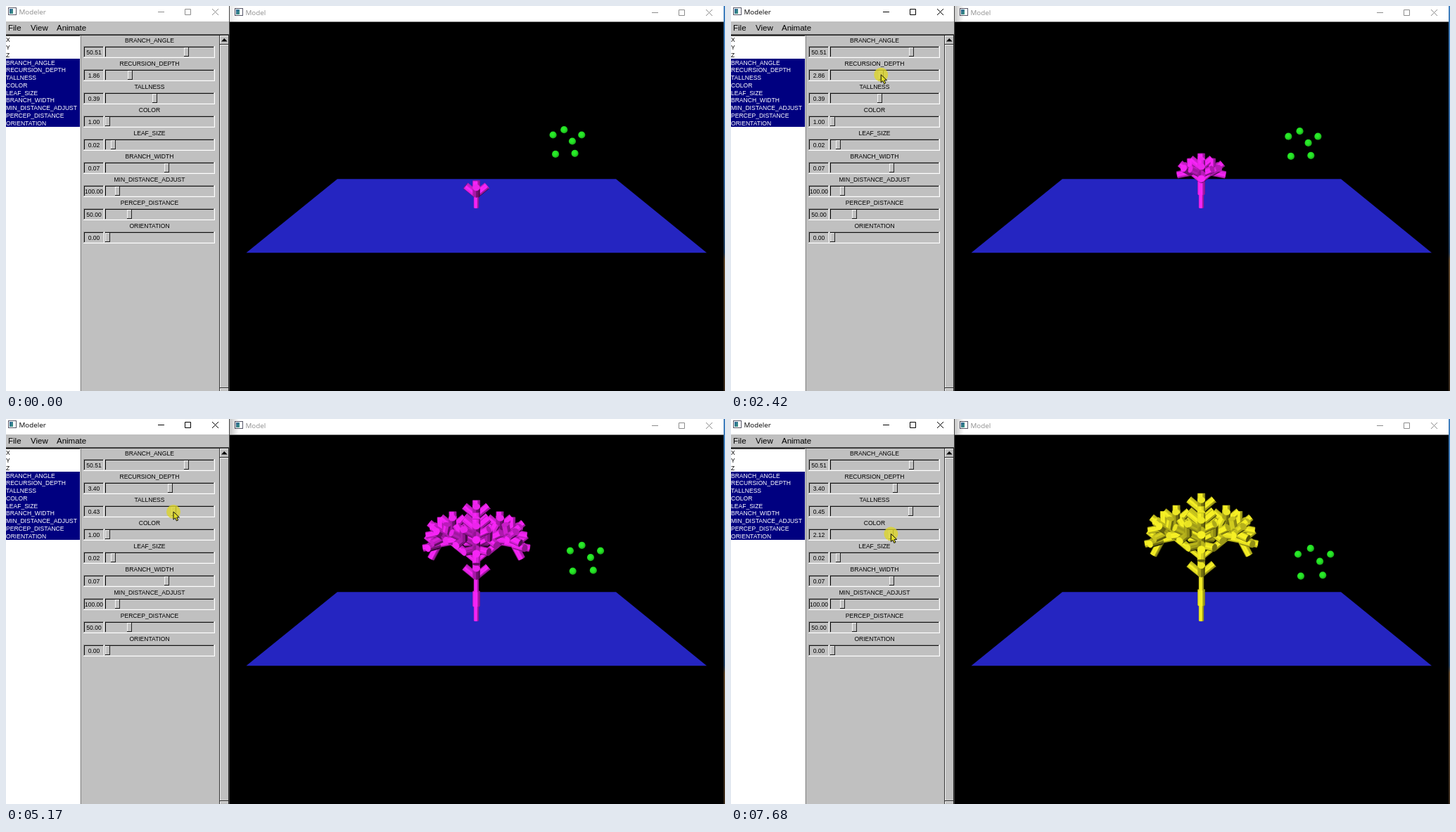
An HTML page that plays this animation: 1022x548 px, repeating every 8000 ms.

```html
<!DOCTYPE html>
<html lang="en">
<head>
<meta charset="utf-8">
<title>Modeler</title>
<style>
html, body { margin: 0; width: 100%; height: 100%; overflow: hidden; background: #000; }
svg { display: block; width: 1022px; height: 548px; }
text { font: 8.55px "Liberation Sans", Arial, sans-serif; white-space: pre; }
.menu { font-size: 11.5px; }
.title { font: 9.8px "Open Sans", "Noto Sans", sans-serif; }
.mid { text-anchor: middle; }
.crisp { shape-rendering: crispEdges; }
#tree { stroke-width: .6; stroke-linejoin: round; }
</style>
</head>
<body>
<svg id="stage" viewBox="0 0 1022 548" xmlns="http://www.w3.org/2000/svg"></svg>
<script>
const LOOP = 8000, STEP = 70;
const TRACK_X = 144.5, TRACK_W = 148;
const stage = document.getElementById('stage');

// Pointer moves: start, end, x, y
const ENTRY = [822, 494];
const MOVES = [
  [40, 850, 157, 96], [850, 1270, 176.3, 94], [1660, 1730, 177.1, 96], [1730, 2150, 207, 97],
  [2350, 2540, 231, 100], [3280, 3350, 233.3, 100], [3560, 4090, 167, 142], [4090, 4370, 211.1, 132],
  [4430, 4990, 238, 132], [5100, 5460, 255.5, 132], [5660, 6150, 144.5, 164],
  [6470, 6900, 176.3, 161], [7000, 7200, 190, 162], [7340, 7680, 227.4, 163.5]
];

// While the button is down the thumb follows the pointer
const DRAGS = {
  depth: { param: 1, press: 1470, release: 3620, min: 1, max: 5, home: 176.3, goal: 233.3 },
  tall: { param: 2, press: 4500, release: 5730, min: 0.3, max: 0.5, home: 211.1, goal: 255.5 },
  color: { param: 3, press: 6540, release: LOOP, min: 1, max: 3, home: 144.5, goal: 227.4 }
};

const BALLS = [[0, 0], [-15.7, 7.3], [25, 7.3], [11.7, 16.3], [-12.2, 34.7], [15.3, 33.6]];
const TINTS = [[246, 37, 246], [246, 240, 37]];

// name, value, thumb centre
const PARAMS = [
  ['BRANCH_ANGLE', '50.51', 256.5], ['RECURSION_DEPTH', '1.86', 176.5], ['TALLNESS', '0.39', 211],
  ['COLOR', '1.00', 144.5], ['LEAF_SIZE', '0.02', 152.5], ['BRANCH_WIDTH', '0.07', 228.5],
  ['MIN_DISTANCE_ADJUST', '100.00', 158], ['PERCEP_DISTANCE', '50.00', 175.5], ['ORIENTATION', '0.00', 144.5]
];

const box = (x, y, w, h, fill, more = '') => `<rect x="${x}" y="${y}" width="${w}" height="${h}" fill="${fill}" ${more}/>`;
const label = (x, y, s, more = '') => `<text x="${x}" y="${y}" ${more}>${s}</text>`;

function bevel(x, y, w, h, light, dark) {
  return box(x, y, w, h, '#c0c0c0') + box(x, y, w, 1, light) + box(x, y, 1, h, light) +
    box(x, y + h - 1, w, 1, dark) + box(x + w - 1, y, 1, h, dark);
}
const raised = (x, y, w, h) => bevel(x, y, w, h, '#f4f4f4', '#222');
const sunken = (x, y, w, h) => bevel(x, y, w, h, '#999', '#fff') + bevel(x + 1, y + 1, w - 2, h - 2, '#111', '#ccc');

function titleBar(x, y, name, xs) {
  const [a, b, c] = xs;
  return box(x + 3.5, y - 5.5, 11, 10, '#fff', 'stroke="#556"') + box(x + 5, y - 4, 5, 7, 'url(#icon)') +
    label(x + 18.5, y + 3.5, name, 'class="title" fill="currentColor"') +
    `<path d="M${a} ${y + .5}h9M${b + .5} ${y - 3.5}h8v8h-8zM${c} ${y - 4}l9 9m0-9l-9 9" fill="none" stroke="currentColor"/>`;
}

function slider([name, value], i) {
  const y = 33 * i;
  return label(204, y + 51.5, name, 'class="mid"') +
    `<g class="crisp">${sunken(110, y + 57, 30, 17)}${sunken(140, y + 57, 157, 17)}</g>` +
    label(125, y + 68.6, value, `class="mid" id="value${i}"`) +
    `<g class="crisp" id="thumb${i}">${raised(-3, y + 59, 7, 13)}</g>`;
}

const listed = ['X', 'Y', 'Z', ...PARAMS.map(p => p[0])];

stage.innerHTML = `
<defs>
  <linearGradient id="icon" x2="1" y2="1"><stop stop-color="#28609a"/><stop offset="1" stop-color="#3f9a80"/></linearGradient>
  <linearGradient id="edge" x2="0" y2="1"><stop stop-color="#3f7fbf"/><stop offset=".45" stop-color="#2a5c94"/><stop offset=".64" stop-color="#24405f"/><stop offset=".66" stop-color="#5d4529"/><stop offset="1" stop-color="#3a2b1c"/></linearGradient>
  <linearGradient id="shade"><stop stop-opacity=".22"/><stop offset="1" stop-opacity="0"/></linearGradient>
  <radialGradient id="ball" cx=".42" cy=".4" r=".62"><stop stop-color="#2cf22c"/><stop offset=".55" stop-color="#24e024"/><stop offset="1" stop-color="#18a018"/></radialGradient>
</defs>
${box(0, 0, 1022, 548, '#000')}
${box(318, 0, 702, 22.5, '#fff')}
${box(1020, 0, 2, 548, 'url(#edge)')}
<g color="#8c8c8c">${titleBar(322, 9, 'Model', [918, 956, 995])}</g>
<polygon points="471,246.2 867,246.2 996,351.3 341.5,351.3" fill="#2525c1"/>
<g id="tree"></g>
<g id="swarm"></g>
${box(318, 0, 13, 22, 'url(#shade)', 'id="shadow"')}
${box(0, 0, 317, 22, '#fff')}
<g id="bar">${titleBar(0, 8, 'Modeler', [216, 254, 293])}</g>
${box(0, 22, 317, 526, '#c0c0c0')}
${label(3, 35, 'File', 'class="menu"')}${label(35, 35, 'View', 'class="menu"')}${label(72, 35, 'Animate', 'class="menu"')}
<g class="crisp">
${box(0, 40, 317, 1, '#555')}${box(0, 41, 317, 1, '#222')}
${box(0, 42, 105, 506, '#fff')}${box(0, 42, 105, 1, '#444')}${box(0, 75, 105, 97, '#000080')}
${box(105, 42, 1, 506, '#e0e0e0')}${box(106, 42, 1, 506, '#888')}
${raised(304, 42, 13, 13)}${raised(304, 55, 13, 489)}${raised(304, 544, 13, 13)}
${box(303, 42, 1, 506, '#333')}${box(317, 0, 1, 548, '#444')}
</g>
<path d="M306 50.5L310.3 46L314.6 50.5z"/>
${listed.map((s, i) => label(0, 51.3 + 10.75 * i, s, `fill="${i < 3 ? '#000' : '#fff'}"`)).join('')}
${PARAMS.map(slider).join('')}
<g id="cursor"><circle id="halo" r="10" fill="#dcd52a"/>
<path d="M0 0V11.2L2.6 8.8L4.4 13L6.6 12L4.8 8H8.4z" fill="#e0dc28" stroke="#111"/></g>`;

const $ = id => document.getElementById(id);

// Pointer position: each move advances in equal ticks
function pointer(t) {
  let [x, y] = ENTRY;
  for (const [from, to, toX, toY] of MOVES) {
    if (t < from) break;
    const n = Math.max(1, Math.round((to - from) / STEP));
    const u = Math.min(1, Math.floor((t - from) / (to - from) * n + 1e-6) / n);
    const p = u * u * (3 - 2 * u);
    x += (toX - x) * p;
    y += (toY - y) * p;
  }
  return [x, y];
}

// Vectors and camera
const dot = (a, b) => a[0] * b[0] + a[1] * b[1] + a[2] * b[2];
const mix = (a, m, b, n) => a.map((v, i) => v * m + b[i] * n);
const unit = a => a.map(v => v / Math.hypot(...a));
const LIGHTS = [unit([4, 2, -4]), unit([-2, 1, 5])];
const AMBIENT = 0.14;
const FOCUS = 986, PITCH = 0.2, CP = Math.cos(PITCH), SP = Math.sin(PITCH);
const EYE = [0, FOCUS * SP, FOCUS * CP];
const BEND = 50.51 * Math.PI / 180, CB = Math.cos(BEND), SB = Math.sin(BEND);
const SIDES = 10, THIN = 3.3, THICK = 5;

const away = p => FOCUS - p[1] * SP - p[2] * CP;
function project(p) {
  const s = FOCUS / away(p);
  return (668.5 + p[0] * s).toFixed(1) + ',' + (287 - (p[1] * CP - p[2] * SP) * s).toFixed(1);
}

function treeMarkup(depth, len, tint) {
  const faces = [];

  function face(points, normal) {
    const mid = points.reduce((a, p) => mix(a, 1, p, 1 / points.length), [0, 0, 0]);
    if (dot(normal, mix(EYE, 1, mid, -1)) <= 0) return;
    const lit = LIGHTS.reduce((s, l) => s + Math.max(0, dot(normal, l)), AMBIENT);
    const rgb = `rgb(${tint.map(v => Math.round(v * Math.min(1, lit)))})`;
    faces.push([away(mid), `<polygon points="${points.map(project).join(' ')}" fill="${rgb}" stroke="${rgb}"/>`]);
  }

  function tube(p, [right, up, fwd], r) {
    const end = mix(p, 1, up, len), low = [], high = [];
    const ray = i => {
      const a = i * 2 * Math.PI / SIDES;
      return mix(right, Math.cos(a), fwd, Math.sin(a));
    };
    for (let i = 0; i < SIDES; i++) {
      low.push(mix(p, 1, ray(i), r));
      high.push(mix(end, 1, ray(i), r));
    }
    for (let i = 0; i < SIDES; i++) {
      const j = (i + 1) % SIDES;
      face([low[i], low[j], high[j], high[i]], ray(i + 0.5));
    }
    face(high, up);
    face(low, up.map(v => -v));
    return end;
  }

  function fork(p, [right, up, fwd], n) {
    for (let q = 0; q < 4; q++) {
      const c = Math.round(Math.cos(q * Math.PI / 2)), s = Math.round(Math.sin(q * Math.PI / 2));
      const side = mix(right, c, fwd, s);
      limb(p, [mix(side, CB, up, -SB), mix(up, CB, side, SB), mix(fwd, c, right, -s)], n, true);
    }
  }

  // A limb of level n is 2^n segments long; new limbs fork at their middle,
  // straight continuations only when they are short
  function limb(p, frame, n, fresh) {
    if (!n) return tube(p, frame, THICK);
    p = tube(p, frame, THIN);
    for (let k = 0; k < n; k++) {
      if (k === n - 1 && (fresh || n === 1)) fork(p, frame, k);
      p = limb(p, frame, k, false);
    }
    return p;
  }

  limb([0, 0, 0], [[1, 0, 0], [0, 1, 0], [0, 0, 1]], depth, true);
  return faces.sort((a, b) => b[0] - a[0]).map(f => f[1]).join('');
}

function setSlider(i, value, x) {
  $('value' + i).textContent = value;
  $('thumb' + i).setAttribute('transform', `translate(${Math.round(x - 0.5)} 0)`);
}
PARAMS.forEach((p, i) => setSlider(i, p[1], p[2]));

// Value of a dragged parameter and how far along its drag it is
function drag({ param, press, release, min, max, home, goal }, t) {
  const x = t < press ? home : pointer(Math.min(t, release - 1))[0];
  const value = min + (max - min) * (x - TRACK_X) / TRACK_W;
  setSlider(param, value.toFixed(2), x);
  return [value, (x - home) / (goal - home)];
}

let treeKey = '';

function draw(t) {
  const [depth, pd] = drag(DRAGS.depth, t);
  const [tall, pt] = drag(DRAGS.tall, t);
  const [color, pc] = drag(DRAGS.color, t);

  const active = t >= DRAGS.depth.press;
  $('bar').setAttribute('color', active ? '#000' : '#8c8c8c');
  $('shadow').setAttribute('opacity', active ? 1 : 0.4);

  const key = [Math.floor(depth), tall, Math.floor(color)].join();
  if (key !== treeKey) {
    treeKey = key;
    $('tree').innerHTML = treeMarkup(Math.floor(depth), tall * 49.4, TINTS[Math.floor(color) - 1]);
  }

  // The flock drifts towards the viewer with every redraw
  const bx = 793.3 + 23.5 * pd + 3 * pt + 4 * Math.sqrt(Math.max(0, pc));
  const by = 176.2 + 3 * pd + pt + 4 * pc * pc;
  const size = 1 + 0.05 * pd + 0.015 * pt + 0.07 * pc;
  $('swarm').innerHTML = BALLS.map(([x, y]) =>
    `<circle cx="${bx + x * size}" cy="${by + y * size}" r="5.1" fill="url(#ball)"/>`).join('');

  const held = Object.values(DRAGS).some(d => t >= d.press && t < d.release);
  $('cursor').setAttribute('transform', `translate(${pointer(t)})`);
  $('cursor').setAttribute('visibility', t < 110 ? 'hidden' : 'visible');
  $('halo').setAttribute('opacity', held ? 0.8 : 0);
}

const start = performance.now();
function loop() {
  draw((performance.now() - start) % LOOP);
  requestAnimationFrame(loop);
}
draw(0);
requestAnimationFrame(loop);
</script>
</body>
</html>
```
